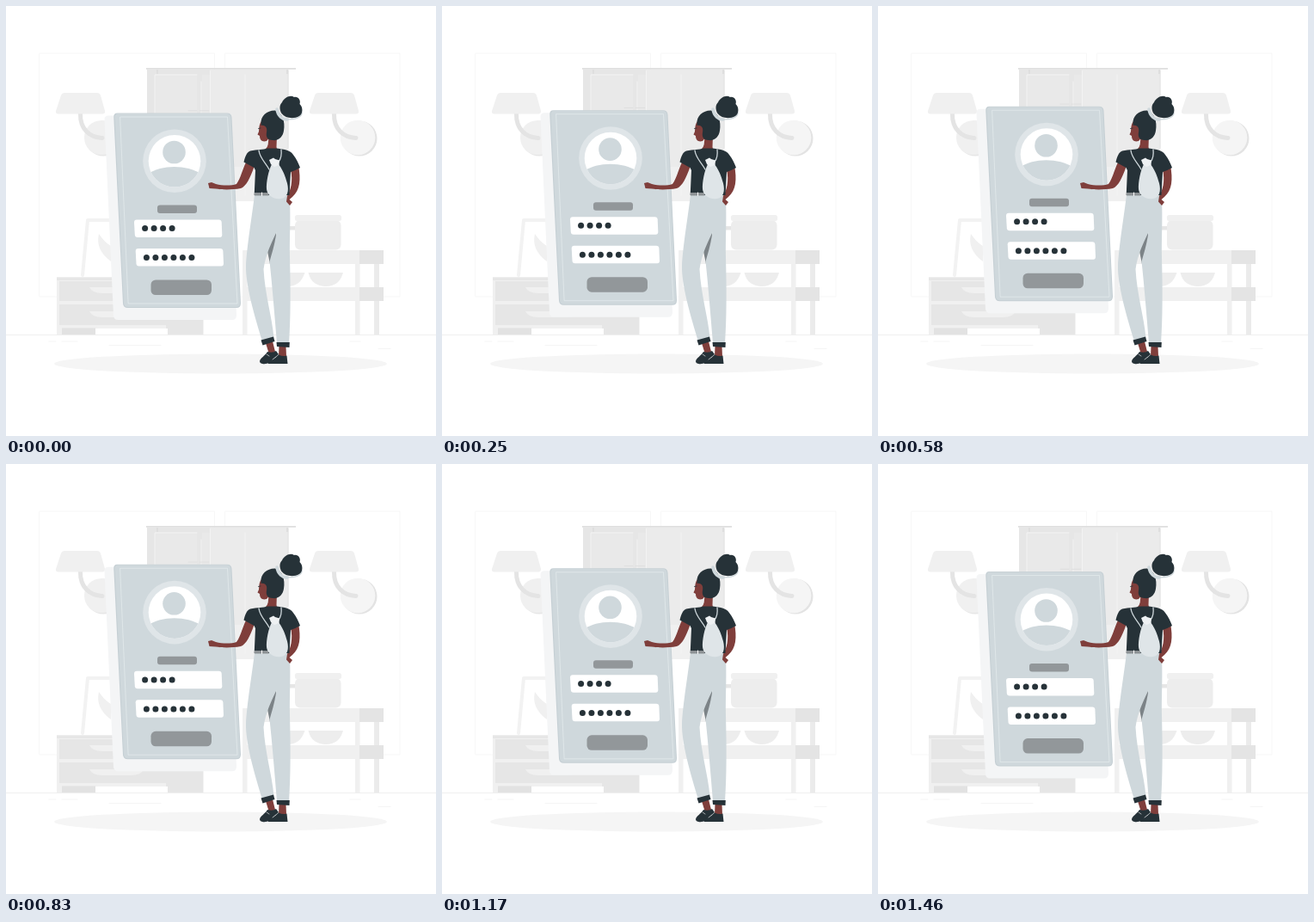
An HTML page that plays this animation: 500 by 500 pixels, repeating every 1500 ms.

```html
<!DOCTYPE html>
<html lang="en">
<head>
<meta charset="utf-8">
<title>Floating login card</title>
<style>
  html, body { margin: 0; width: 100%; height: 100%; overflow: hidden; background: #fff; }
  svg { display: block; width: 100%; height: 100%; }
  .pale { fill: #f5f5f5; }
  .light { fill: #f0f0f0; }
  .mid { fill: #e6e6e6; }
  .blue { fill: #cfd8dc; }
  .dark { fill: #263238; }
  .skin { fill: #7f3e3b; }
  .grey { fill: #92979a; }
  .white { fill: #fff; }
  .line { fill: none; stroke-linecap: round; stroke-linejoin: round; }
</style>
</head>
<body>
<svg viewBox="0 0 500 500">
  <g id="wall">
    <path class="line" stroke="#f5f5f5" stroke-width=".8" d="M39 55H242.500V338H39ZM255 55H458V338H255Z"/>
    <path class="mid" d="M164 74H238V228H164Z"/>
    <path fill="#ebebeb" d="M238 74H328.500V218H238Z"/>
    <path class="light" d="M238 187H300V227H238Z"/>
    <path fill="#e9e9e9" d="M173 80H222V220H173ZM228 80H237V220H228Z"/>
    <path class="line" stroke="#f3f3f3" d="M173 220V80H222M227 88V220M278 80V220M237.500 75V220"/>
    <path class="line" stroke="#e2e2e2" d="M328 75V165"/>
    <path fill="#dedede" d="M163 72H337V73.700H163ZM175 74H177V79H175ZM326 74H328V79H326Z"/>
  </g>

  <g id="lamps">
    <circle class="mid" cx="113" cy="154" r="20.500"/>
    <circle class="light" cx="111" cy="153" r="20"/>
    <circle fill="#e3e3e3" cx="411" cy="154" r="20.500"/>
    <circle class="pale" cx="409" cy="153" r="20.300"/>
    <g id="lamp">
      <path class="line" stroke="#e4e4e4" stroke-width="5" d="M86.500 125C86 143 97 153 112 153.500"/>
      <path class="light" d="M68 101H106Q109 101 110 104L115 122Q115.500 125.500 112 125.500H61Q57.500 125.500 58 122L64 104Q65 101 68 101Z"/>
    </g>
    <use href="#lamp" x="295"/>
  </g>

  <g id="furniture">
    <path class="line" stroke="#f2f2f2" stroke-width="4" d="M89 313L95 249H150"/>
    <path class="light" d="M108 265C105 278 110 288 122 297V279C117 276 112 271 108 265Z"/>
    <path class="light" d="M59 315.500H190V382H59Z"/>
    <path class="mid" d="M186 315.500H229.500V382H186ZM59 315.500H190V319H59ZM62 320H186V343H62ZM62 347H186V371H62Z"/>
    <path class="white" d="M104 375H188V382H104Z"/>
    <path fill="#e2e2e2" d="M65 374.500H104V382H65Z"/>
    <path class="light" d="M97 327H160Q157 334 145 334H112Q100 334 97 327ZM97 355H160Q157 362 145 362H112Q100 362 97 355Z"/>
    <path class="light" d="M275 300H280.500V382H275ZM406 300H411.500V382H406Z"/>
    <path fill="#ebebeb" d="M428 300H434V382H428Z"/>
    <path class="light" d="M275 284H411V300H275ZM275 327H411V343H275Z"/>
    <path fill="#e4e4e4" d="M411 284H439V300H411ZM411 327H439V343H411Z"/>
    <path fill="#ededed" d="M351.500 310H392C389 321 382 326 372 326S354 321 351.500 310ZM310 310H347.500C344 321 337 326 328 326S312 321 310 310Z"/>
    <rect fill="#ededed" x="336" y="249" width="53.500" height="34.500" rx="6"/>
    <rect class="light" x="336" y="243" width="54" height="7" rx="2.500"/>
    <path class="mid" d="M322 256H336V260.500H322Z"/>
    <path class="line" stroke="#ebebeb" stroke-width=".8" d="M0 382.500H500"/>
    <path class="line" stroke="#f3f3f3" stroke-width=".8" d="M50 390H58M65 390H83M120 394.500H180M400 390H412M433 398.500H447"/>
  </g>

  <ellipse class="pale" cx="249.500" cy="416" rx="193.500" ry="11.500"/>

  <g id="card">
    <path fill="#f4f5f6" d="M119 127.500H250Q255 127.500 256 132L268 359Q268 365 263 365H130Q125.500 365 125 360L114.500 132Q114.500 127.500 119 127.500Z"/>
    <path class="line" stroke="#dcdcdc" stroke-width=".8" d="M212 121.800H222M225 121.800H236"/>
    <path fill="#c5cfd4" d="M129.500 124.500H257Q262 124.500 262.500 129.500L273 345.500Q273 351 268 351H141.500Q136.500 351 136 346L125.300 129.500Q125 124.500 129.500 124.500Z"/>
    <path class="blue" d="M130.500 125H256.500Q261 125 261.500 129.500L272 345.500Q272 350 267.500 350H142Q137.500 350 137 345.500L126.500 129.500Q126.500 125 130.500 125Z"/>
    <path class="line" stroke="#e6ecee" stroke-width=".7" d="M133 129H257.500L269 346H142.500Z"/>
    <ellipse fill="#dfe5e8" cx="196" cy="180.300" rx="36.800" ry="36.800"/>
    <clipPath id="portrait"><circle cx="196" cy="180.300" r="30.300"/></clipPath>
    <g clip-path="url(#portrait)">
      <path class="white" d="M160 145H232V216H160Z"/>
      <circle class="blue" cx="195.500" cy="170" r="13.300"/>
      <path class="blue" d="M164 196C180 184 211 184 228 196V216H164Z"/>
    </g>
    <rect class="grey" x="176" y="231.500" width="46" height="9.500" rx="3"/>
    <path class="white" d="M152 248.500H247.500Q250.500 248.500 250.700 251.500L251.300 266Q251.300 269 248.500 269H153Q150 269 149.800 266L149 251.500Q149 248.500 152 248.500Z"/>
    <path class="white" d="M153.700 282H249.200Q252.200 282 252.400 285L253 299.500Q253 302.500 250.200 302.500H154.700Q151.700 302.500 151.500 299.500L150.700 285Q150.700 282 153.700 282Z"/>
    <g id="dots" class="dark"></g>
    <rect class="grey" x="168.500" y="318.500" width="70.500" height="17.500" rx="5.500"/>
  </g>

  <g id="woman">
    <path class="skin" d="M302 392L310 390 313 402 306 405ZM317.500 395H325.500L326 408H317Z"/>
    <path class="dark" d="M295 413C296 409 301 407 304 402Q310 404 314 401L317 405 306 414.500C303 417 295 417 295 413Z"/>
    <path class="dark" d="M304.500 415C306 411 313 410 317 405.500Q322 408 326.500 406.500L327.500 416H305Z"/>
    <path class="line" stroke="#fff" stroke-width=".6" d="M310 411L314 408M303 405L306 407"/>
    <path fill="#7c8387" d="M314 260L304 285 307 300 315 285Z"/>
    <path class="blue" d="M289 219.500H329.500C331.500 240 329.500 270 330 292C331 330 331 365 329 392H315C312 355 309 320 306.500 297C309 288 312 280 314.500 263C309 275 302 288 299.500 306C301 335 309 360 311.500 386L298 390C289 360 278.500 325 279 302C280 280 286 245 289 219.500Z"/>
    <path class="dark" d="M296.500 388.500L311 384.500 312.500 390 298.500 394.500ZM314.500 391H329.800L329.500 397 315 396Z"/>

    <path class="skin" d="M279 182L288.500 187C284 200 279 210 273 212C262 214 250 213.500 244 212.500L236.500 212 235 206 239 205 244 207C252 209 262 209 268 207C273 200 274.500 191 279 182Z"/>
    <path class="skin" d="M331 190L340 185C343 202 342 214 333 222L329.500 225 333 228 330 232 326 227.500 327 221C331 214 334 204 331 190Z"/>
    <path class="skin" d="M305 150H315L314.500 164Q316 168 312 169H306L302 166Q306 163 305 150Z"/>
    <path class="dark" d="M284 168.500C292 167 299 167 304 165.500H315C324 166.500 331 168 334 173C338 178 340 183 342 188Q337 191 331 193L329.500 220H288.700L290 191 288.500 188 276.500 181.500C278 175 280 170 284 168.500Z"/>
    <path fill="#8d9295" d="M289 217H305V220.500H289Z"/>
    <path class="line" stroke="#fff" d="M297.500 217V220.500"/>

    <path class="line" stroke="#cfd8dc" stroke-width="1.300" d="M294 168C295 177 302 182 306 190M320 167Q321 176 317 181"/>
    <path fill="#dfe5e8" d="M309 184C305 192 302.500 205 303 213C304 222 314 226 322 223.500C329 221 329 211 326 203C324 195 320 188 317 184Z"/>
    <path fill="#eef1f3" d="M306 179L311 176.500 313 178 318 179.500 317.500 185 312 187 308 184Z"/>

    <path class="skin" d="M297 134C294 138 294.500 142 294 146L292.500 149.500 295 151C295 156 298 158.500 303 157L309 150 307 136Z"/>
    <path class="dark" d="M296.500 136C296 128 304 121 313 121.500C321 124 325 134 323 145C322 152 317 157 310 156C304 156 302 152 303 147C304 142 302 138 296.500 139Z"/>
    <path class="line" stroke="#263238" stroke-width=".8" d="M293.500 142.500L296 142"/>
    <path class="line" stroke="#cfd8dc" stroke-width="3.500" d="M315 120C316 128 322 132.500 327 132"/>
    <path class="line" stroke="#cfd8dc" stroke-width="1.500" d="M325 132C332 132 344 131 344 124"/>
    <path class="dark" d="M321 112C324 106 331 103 335 106C340 105 343 110 341.500 114C346 118 345 126 341 128C335 131.500 325 131 320.500 125C317.500 120 318 115 321 112Z"/>
  </g>
</svg>
<script>
  const card = document.getElementById('card');
  const dots = document.getElementById('dots');
  const PERIOD = 1500, LEAD = 45, RISE = 10;

  const dotRow = (count, x, y) => Array.from({ length: count }, (_, i) =>
    `<circle cx="${x + i * 10.5}" cy="${y}" r="3.5"/>`).join('');
  dots.innerHTML = dotRow(4, 161.6, 258.6) + dotRow(6, 163.4, 292.6);

  // Linear rise and fall; the loop starts just after the lowest point.
  function draw(now) {
    const phase = (now + LEAD) / PERIOD % 1;
    const lift = RISE * (1 - Math.abs(2 * phase - 1));
    card.setAttribute('transform', `translate(0 ${(0.6 - lift).toFixed(3)})`);
    requestAnimationFrame(draw);
  }
  draw(0);
</script>
</body>
</html>
```
